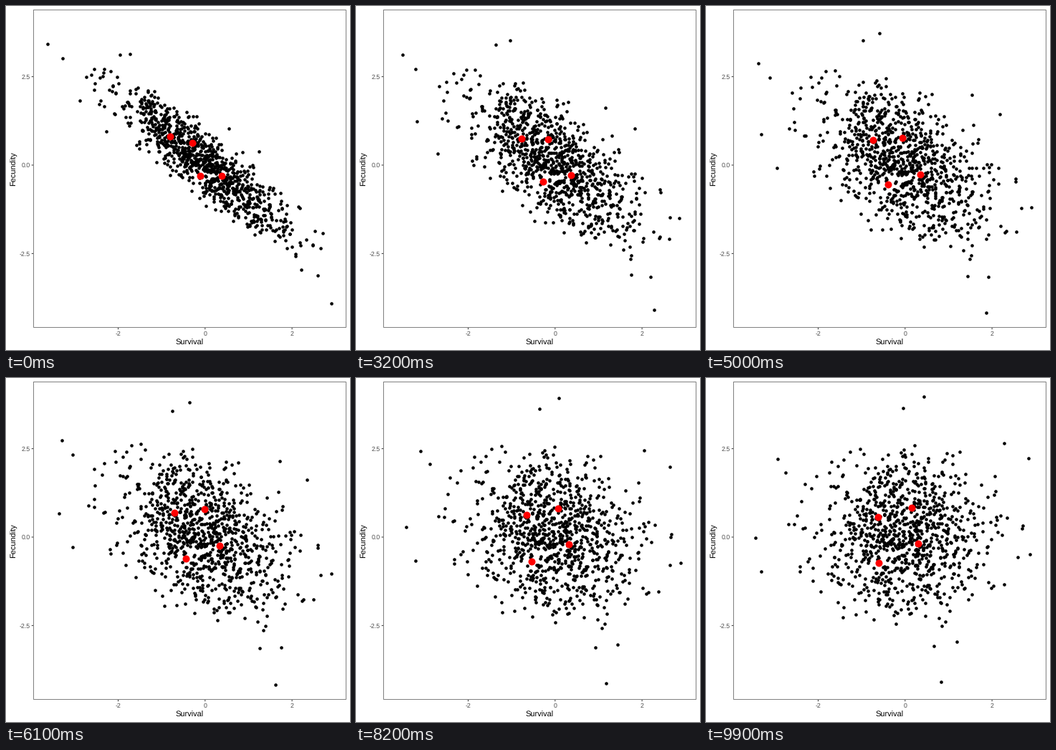
Recreate the animation shown at these times as a matplotlib script. Size 480 px wide and 480 px high, loop 10 s.

```python
import matplotlib.pyplot as plt
import numpy as np
from matplotlib.animation import FuncAnimation

SIZE, DPI, FRAMES = 480, 72, 100
ORIGIN = np.array([277.8, 222.0])    # pixel of data (0, 0)
CENTER = np.array([277.0, 219.6])    # pixel of the cloud's mean
UNIT = np.array([60.65, -49.35])     # pixels per data unit
RHO = np.array([-0.9, -0.75, -0.5, -0.25, 0.0])

plt.rcParams.update({"font.family": "Liberation Sans", "text.hinting": "none"})

# Key points of the uncorrelated cloud, in pixels
EXTREMES = [(100, 113.5), (111, 131.5), (68.5, 223), (77, 269.5),
            (304, 25.5), (275, 42), (450, 111.5), (416, 91),
            (451.5, 245.5), (328, 424), (317.5, 374), (349.5, 367.5)]
MARKED = [(240.3, 193.6), (286.5, 180.8), (240.5, 258.4), (296, 231)]


def to_data(pixels):
    return (np.array(pixels) - CENTER) / UNIT


def make_cloud(n, reach=2.75):
    """Standard normal points, kept inside the extremes."""
    rng = np.random.default_rng(12)
    points = rng.normal(size=(2 * n, 2))
    return points[np.hypot(*points.T) < reach][:n]


def correlate(points, i):
    """Scale the cloud along its two diagonals, linearly between states."""
    t = 4 * i / (FRAMES - 1)
    a = np.interp(t, range(5), np.sqrt(1 + RHO))
    b = np.interp(t, range(5), np.sqrt(1 - RHO))
    u = a * (points[:, 0] + points[:, 1]) / 2
    v = b * (points[:, 0] - points[:, 1]) / 2
    return CENTER + UNIT * np.column_stack([u + v, u - v])


cloud = np.vstack([make_cloud(984), to_data(EXTREMES)])
marked = to_data(MARKED)

fig = plt.figure(figsize=(SIZE / DPI, SIZE / DPI), dpi=DPI, facecolor="white")
ax = fig.add_axes([0, 0, 1, 1])
ax.set(xlim=(0, SIZE), ylim=(SIZE, 0))
ax.axis("off")


def line(xs, ys, color):
    ax.plot(xs, ys, color=color, lw=1, solid_capstyle="butt",
            solid_joinstyle="miter", snap=False, zorder=1)


def label(x, y, text, size=8.8, color="#4d4d4d", ha="center", **kw):
    ax.text(x, y, text, size=size, color=color, ha=ha, va="baseline", **kw)


L, T, R, B = 38.5, 5.5, 474.5, 448.5
line([L, R, R, L, L], [T, T, B, B, T], "#808080")

for value in (-2, 0, 2):
    x = ORIGIN[0] + UNIT[0] * value
    line([x, x], [B + 0.5, B + 2.75], "#333333")
    label(x, 459.9, f"{value}")

for value in (-2.5, 0.0, 2.5):
    y = ORIGIN[1] + UNIT[1] * value
    line([L - 2.75, L - 0.5], [y, y], "#333333")
    label(33.5, y + 3.15, f"{value:.1f}", ha="right")

label(256.5, 472.6, "Survival", 11, "black")
label(13.4, 227, "Fecundity", 11, "black", rotation=90, rotation_mode="anchor")


def dots(points, diameter, color, z):
    xy = correlate(points, 0)
    return ax.scatter(xy[:, 0], xy[:, 1], s=diameter ** 2, c=color,
                      linewidths=0, zorder=z)


black = dots(cloud, 4.6, "black", 2)
red = dots(marked, 10, "red", 3)


def update(i):
    black.set_offsets(correlate(cloud, i))
    red.set_offsets(correlate(marked, i))
    return black, red


anim = FuncAnimation(fig, update, frames=FRAMES, interval=100,
                     repeat=True, repeat_delay=0, blit=False)
plt.show()
```
